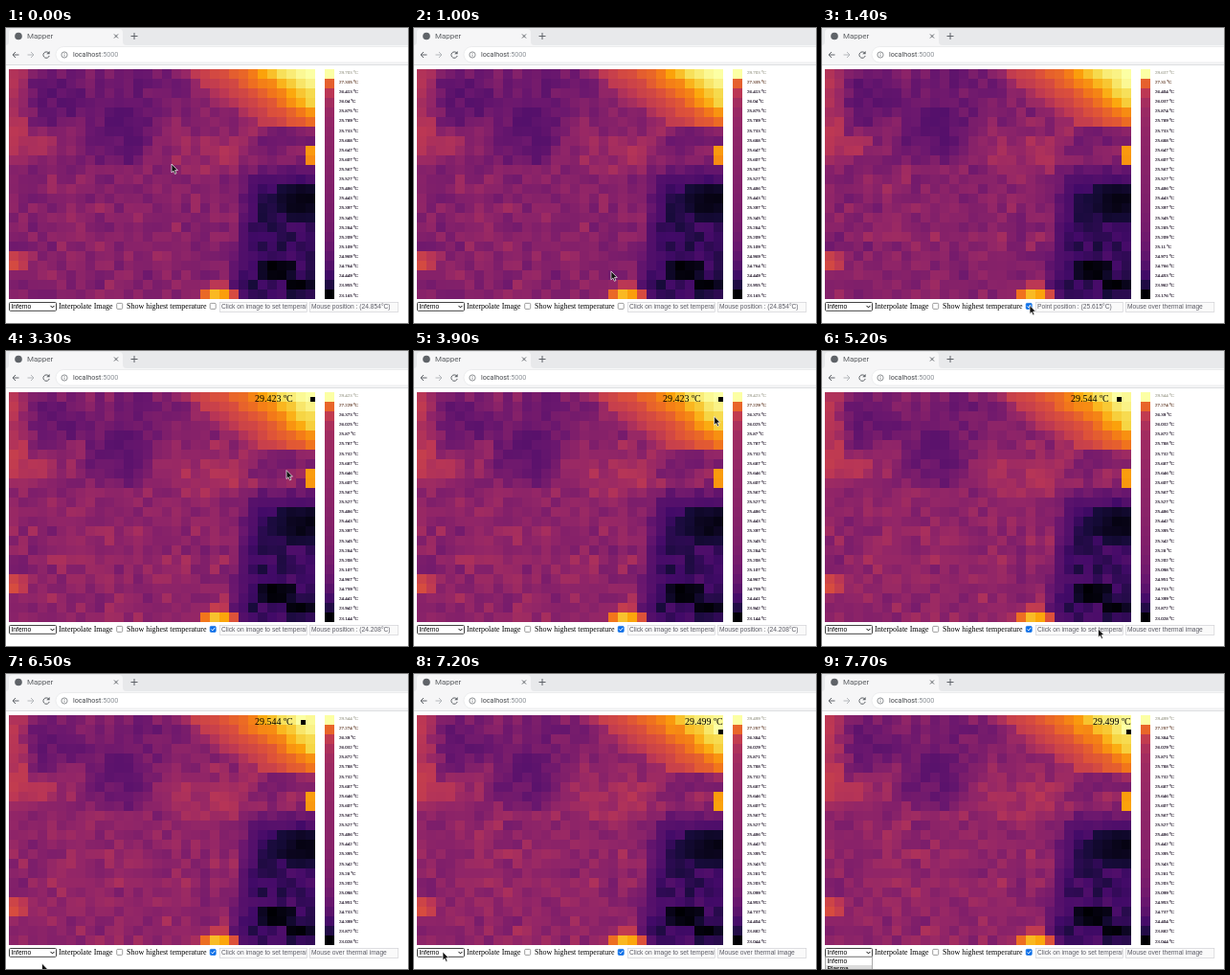
Animation of 420x308 px, one loop 8000 ms. Source, as an HTML page:

```html
<!DOCTYPE html>
<html lang="en">
<head>
<meta charset="utf-8">
<title>Mapper</title>
<style>
html, body { margin: 0; width: 100%; height: 100%; overflow: hidden; background: #fff; }
svg { display: block; position: absolute; left: 0; top: 0; }
text { white-space: pre; }
.ui { font-family: Roboto, sans-serif; }
.sans { font-family: "Liberation Sans", Arial, sans-serif; font-size: 6.667px; }
.serif { font-family: "Liberation Serif", "Times New Roman", serif; font-size: 8px; }
.label { font-size: 5px; stroke-width: .12; }
.hint { fill: #5c5c66; }
.field { fill: #fafafa; stroke: #d2d2d6; stroke-width: .7; }
.icon { fill: none; stroke: #5f6368; stroke-width: 1; }
.thin { stroke-width: .7; }
</style>
</head>
<body>
<svg id="stage" width="420" height="308" viewBox="0 0 420 308">
  <defs>
    <clipPath id="clip"><rect x="224" y="286" width="89.5" height="11"/></clipPath>
  </defs>

  <!-- browser frame -->
  <rect width="420" height="18" fill="#e8e9eb"/>
  <rect y="18" width="420" height="20" fill="#f6f6f7"/>
  <path d="M0 18Q3 18 3 14V5Q3 1 7 1H118Q122 1 122 5V14Q122 18 126 18Z" fill="#f6f6f7"/>
  <circle cx="13" cy="8.500" r="3.800" fill="#5f6368"/>
  <text class="ui" x="22" y="11.200" font-size="8" fill="#5a5d61">Mapper</text>
  <path class="icon" d="M113 6.500l4 4m0-4l-4 4"/>
  <path class="icon" d="M130.500 8.500h7m-3.500-3.500v7"/>
  <path class="icon" d="M13.500 28H7m3-3l-3 3 3 3"/>
  <path class="icon" d="M22.500 28H29m-3-3l3 3-3 3" style="stroke:#b4b7bb"/>
  <path class="icon" d="M44.700 26.200A3.200 3.200 0 1 0 45.200 29"/>
  <path d="M45.600 24v3.300h-3.300z" fill="#5f6368"/>
  <rect x="52" y="19.500" width="380" height="16.500" rx="8.200" fill="#fff" stroke="#e6e7e9" stroke-width=".7"/>
  <circle class="icon thin" cx="61" cy="28" r="3.100"/>
  <path class="icon thin" d="M61 27.600v2m0-3.500v.8"/>
  <text class="ui" x="70" y="30.400" font-size="7.200" fill="#45484c">localhost<tspan fill="#8a8f95">:5000</tspan></text>
  <path d="M0 38.500H420" stroke="#dcdee0"/>

  <g id="map" shape-rendering="crispEdges"></g>
  <g id="legend"></g>
  <g id="peak">
    <text id="peakText" class="serif" y="53" style="font-size:10px"></text>
    <rect id="peakMark" width="5" height="5"/>
  </g>

  <!-- controls -->
  <rect x="3.500" y="286.500" width="49" height="8.800" rx="1" fill="#fff" stroke="#444"/>
  <text class="sans" x="5.500" y="293.200">Inferno</text>
  <path class="icon" d="M46.500 289.900l2 2 2-2" style="stroke:#000"/>
  <text class="serif" x="55" y="293">Interpolate Image</text>
  <rect class="thin" x="115.700" y="287.400" width="6" height="6" rx="1" fill="#fff" stroke="#767676"/>
  <text class="serif" x="126" y="293">Show highest temperature</text>
  <rect id="box" class="thin" x="213.200" y="287.400" width="6" height="6" rx="1"/>
  <path id="tick" d="M214.500 290.500l1.300 1.400 2.500-3" fill="none" stroke="#fff"/>
  <rect class="field" x="223.300" y="286.400" width="91" height="10"/>
  <g clip-path="url(#clip)"><text id="point" class="sans hint" x="225" y="293.200"></text></g>
  <rect class="field" x="317.300" y="286.400" width="92.500" height="10"/>
  <text id="mouse" class="sans hint" x="319" y="293.200"></text>

  <g id="menu">
    <rect class="thin" x="3.500" y="295.500" width="49" height="20" fill="#fff" stroke="#888"/>
    <rect id="hover" x="4" width="48" height="8" fill="#dcdcdc"/>
    <text class="sans" x="5.500" y="302.200">Inferno</text>
    <text class="sans" x="5.500" y="310.200">Plasma</text>
  </g>
  <path id="cursor" class="thin" d="M0 0V9L2 7.200 3.500 10.400 5 9.700 3.600 6.600H6.400Z" fill="#111" stroke="#fff"/>
</svg>
<script>
const LOOP = 8000, COLS = 32, ROWS = 24, CELL = 10, LEFT = 3, TOP = 43;
const NS = "http://www.w3.org/2000/svg";
const $ = id => document.getElementById(id);
const clamp = x => Math.max(0, Math.min(1, x));

function add(parent, name, attrs) {
  const el = document.createElementNS(NS, name);
  for (const k in attrs) el.setAttribute(k, attrs[k]);
  return parent.appendChild(el);
}

const IDLE = "Mouse over thermal image", CLICK = "Click on image to set temperature";
const readings = [
  { at: 0, hot: 29.703, cold: 23.165, peak: [31, 0], point: CLICK, mouse: "Mouse position : (24.854°C)" },
  { at: 1200, hot: 29.637, cold: 23.176, peak: [31, 0], point: "Point position : (25.615°C)", mouse: IDLE },
  { at: 3300, hot: 29.423, cold: 23.144, peak: [31, 0], point: CLICK, mouse: "Mouse position : (24.208°C)" },
  { at: 5200, hot: 29.544, cold: 23.028, peak: [30, 0], point: CLICK, mouse: IDLE },
  { at: 7200, hot: 29.499, cold: 23.044, peak: [31, 1], point: CLICK, mouse: IDLE }
];

// Temperature at step i of the scale: a gentle slope with steep ends
function temperature({ hot, cold }, i) {
  const last = ROWS - 1, mid = x => 25.95 - .038 * x;
  return mid(i) + (hot - mid(0)) * Math.exp(-.97 * i) - (mid(last) - cold) * Math.exp(.5 * (i - last));
}

const inferno = ["000004", "160b39", "420a68", "6a176e", "932667", "bc3754",
  "dd513a", "f37819", "fca50a", "f6d746", "fcffa4"]
  .map(h => [0, 2, 4].map(i => parseInt(h.slice(i, i + 2), 16)));

function color({ hot, cold }, t) {
  const x = clamp((t - cold) / (hot - cold)) * 9.999, i = Math.floor(x);
  return `rgb(${inferno[i].map((v, k) => Math.round(v + (inferno[i + 1][k] - v) * (x - i)))})`;
}

function noise(n, seed) {
  let h = Math.imul(n + 1, 374761393) + Math.imul(seed + 7, 668265263);
  h = Math.imul(h ^ (h >>> 13), 1274126177);
  h = Math.imul(h ^ (h >>> 15), 2246822519);
  return ((h ^ (h >>> 16)) >>> 0) / 4294967296 - .5;
}

// Warm and cool spots: centre, radii, strength
const spots = [
  [4.5, 2.5, 3.5, 3, -.05], [13, 2, 5, 3, -.035], [11, 6.5, 3.5, 3, -.055], [28, 6.8, 2.5, 1, -.04],
  [0, 4, 1.6, 5, .05], [2, 7.5, 3, 1.5, .03], [0, 19.7, 1.2, 1, .15], [20, 8.5, 4, 2.5, .025],
  [31, 8.5, .7, 1, .36], [21.5, 23.2, 2, 1.1, .38],
  [29.8, 13.2, 2.4, 2, -.1], [27.5, 20.5, 2, 1, -.16], [29.8, 22, 1.4, .8, -.16]
];

function warmth(c, r) {
  const corner = r < 6 ? Math.max(0, c - 17 - 1.4 * r) * .04 : 0;
  const shade = clamp((c - 23 + (r - 16) * .15) / 2) * clamp((r - 9.2) / 2.5) * .17;
  return spots.reduce((v, [x, y, rx, ry, s]) => {
    const d = ((c - x) / rx) ** 2 + ((r - y) / ry) ** 2;
    return v + s * Math.exp(-d * d);
  }, corner - shade);
}

// Rank the cells by warmth, then spread them over the scale
function cellColors(reading, seed) {
  const out = [], peak = reading.peak[0] + reading.peak[1] * COLS;
  const ranked = cells.map((_, n) => ({
    n, v: n === peak ? 9 : warmth(n % COLS, Math.floor(n / COLS)) + .04 * noise(n, 0) + .02 * noise(n, seed + 1)
  })).sort((a, b) => b.v - a.v);
  ranked.forEach(({ n }, k) => {
    out[n] = color(reading, temperature(reading, k / (ranked.length - 1) * (ROWS - 1)));
  });
  return out;
}

const cells = Array.from({ length: COLS * ROWS }, (_, n) => add($("map"), "rect",
  { x: LEFT + n % COLS * CELL, y: TOP + Math.floor(n / COLS) * CELL, width: CELL, height: CELL }));
const steps = Array.from({ length: ROWS }, (_, i) => {
  const ink = ["#a4a496", "#5c3420"][i] || "#1c1024";
  return {
    bar: add($("legend"), "rect",
      { x: 333, y: TOP + i * CELL, width: CELL, height: CELL, "shape-rendering": "crispEdges" }),
    label: add($("legend"), "text",
      { x: 348, y: 47.8 + i * 10.12, class: "serif label", fill: ink, stroke: ink })
  };
});
const maps = readings.map(cellColors);

let shown = -1;
function showReading(k) {
  if (k === shown) return;
  shown = k;
  const now = readings[k], [c, r] = now.peak;
  cells.forEach((el, n) => el.setAttribute("fill", maps[k][n]));
  steps.forEach(({ bar, label }, i) => {
    const t = temperature(now, i);
    bar.setAttribute("fill", color(now, t));
    label.textContent = +t.toFixed(3) + " ºC";
  });
  $("point").textContent = now.point;
  $("mouse").textContent = now.mouse;
  $("peakText").textContent = now.hot + " ºC";
  $("peakText").setAttribute("x", r ? 283 : 260);
  $("peakMark").setAttribute("x", LEFT + (c + .5) * CELL);
  $("peakMark").setAttribute("y", TOP + (r + .5) * CELL);
}

// Pointer moves: start, end, then where it rests
const moves = [
  [0, 0, 173, 142], [100, 200, 172.5, 147], [400, 1200, 217, 289.5], [3200, 3300, 293, 124.5],
  [3300, 4100, 320.5, 49.5], [4300, 4600, 233.5, 210], [4900, 5200, 288.5, 290], [5200, 5500, 328, 300],
  [5500, 5800, 361, 292.5], [6400, 6500, 37.5, 302], [6500, 7000, 30, 290], [7300, 7700, 31, 310]
];

function pointer(t) {
  return moves.reduce(([px, py], [from, to, x, y]) => {
    const f = t >= to ? 1 : clamp((t - from) / (to - from));
    return [px + (x - px) * f, py + (y - py) * f];
  }, [0, 0]);
}

const show = (id, on) => $(id).setAttribute("visibility", on ? "visible" : "hidden");

function draw(time) {
  const t = Math.floor(time % LOOP / 100) * 100, checked = t >= 1400;
  showReading(readings.filter(r => r.at <= t).length - 1);
  $("box").setAttribute("fill", checked ? "#0b6fe8" : "#fff");
  $("box").setAttribute("stroke", checked ? "#0b6fe8" : "#767676");
  show("tick", checked);
  show("peak", t >= 3300);
  show("menu", t >= 7400);
  $("hover").setAttribute("y", t < 7600 ? 296 : 304);
  show("cursor", t < 6200 || t >= 6500);
  $("cursor").setAttribute("transform", `translate(${pointer(t)})`);
}

const start = performance.now();
function frame() {
  draw(performance.now() - start);
  requestAnimationFrame(frame);
}
frame();
</script>
</body>
</html>
```
